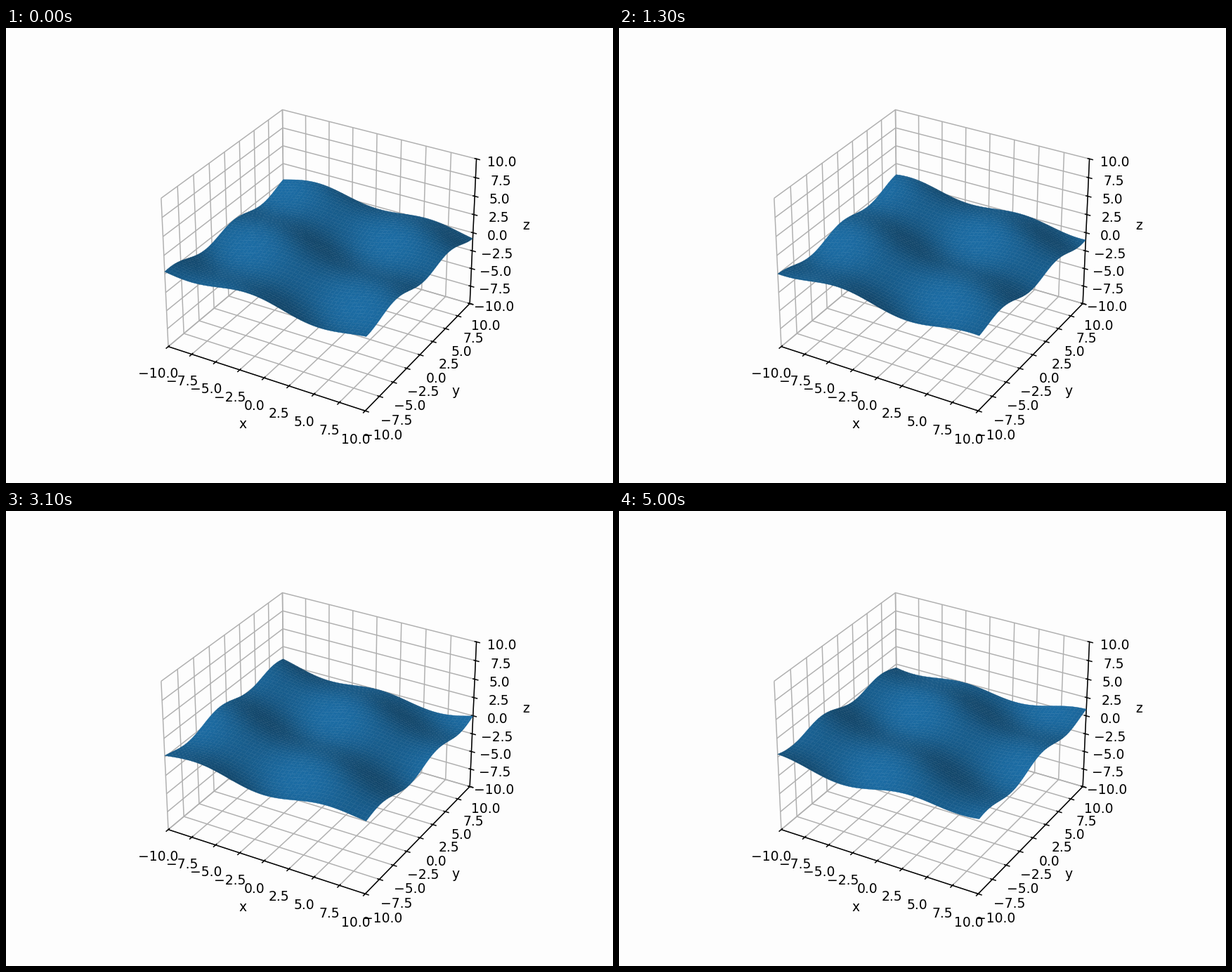
These frames come from a looping animation (864x648 px, 5100 ms). A matplotlib script:

```python
import numpy as np
import matplotlib.pyplot as plt
from matplotlib.animation import FuncAnimation

FRAMES, STEP = 51, 0.1
PAPER = "#fdfdfd"
LIMIT = 10

# Plane waves: amplitude, wave vector (kx, ky), angular speed, phase
WAVES = [
    (0.53, 0.512, 0.1355, 0.87, 1.925),
    (0.53, 0.190, 0.623, 0.51, 1.133),
]

fig = plt.figure(figsize=(6.4, 4.8), dpi=135, facecolor=PAPER)
ax = fig.add_subplot(projection="3d", facecolor=PAPER)
ax.set(xlim=(-LIMIT, LIMIT), ylim=(-LIMIT, LIMIT), zlim=(-LIMIT, LIMIT),
       xlabel="x", ylabel="y", zlabel="z")
for axis in (ax.xaxis, ax.yaxis, ax.zaxis):
    axis.set_pane_color(PAPER)

side = np.linspace(-LIMIT, LIMIT, 100)
x, y = np.meshgrid(side, side)
surface = None


def height(t):
    return sum(a * np.cos(kx * x + ky * y + w * t + phase)
               for a, kx, ky, w, phase in WAVES)


def draw(i):
    global surface
    if surface is not None:
        surface.remove()
    # Hairline edges, shaded like the faces, soften the mesh seams
    surface = ax.plot_surface(x, y, height(i * STEP), color="C0",
                              edgecolors="C0", linewidths=0.2)
    return [surface]


anim = FuncAnimation(fig, draw, frames=FRAMES, interval=100,
                     init_func=lambda: [], repeat=True, repeat_delay=0)
plt.show()
```
